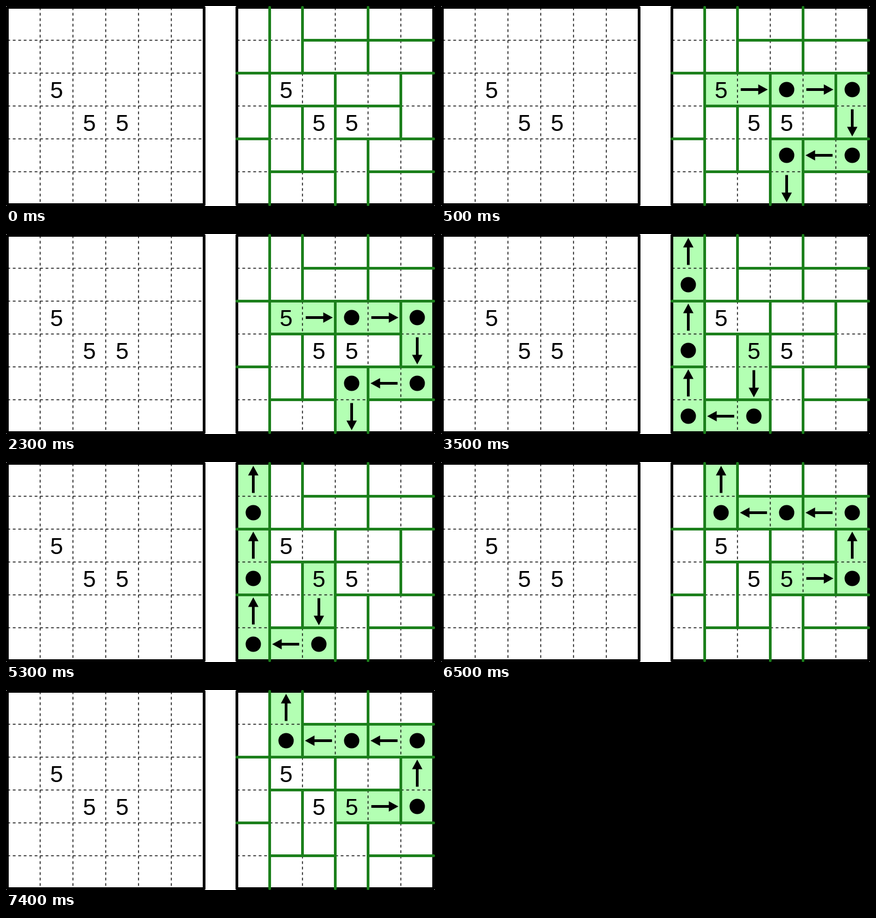
These frames come from a looping animation (785 px wide and 365 px high, 8000 ms). An HTML page:

```html
<!DOCTYPE html>
<html lang="en">
<head>
<meta charset="utf-8">
<title>Domino path puzzle</title>
<style>
html, body { margin: 0; width: 100%; height: 100%; overflow: hidden; background: #fff; }
svg { display: block; width: 785px; height: 365px; }
.dash { fill: none; stroke: #000; stroke-width: 1.5; stroke-dasharray: 5 5; }
.frame { fill: none; stroke: #000; stroke-width: 5; stroke-linejoin: round; }
.wall { fill: none; stroke: #1c801c; stroke-width: 5; stroke-linecap: round; }
.area { fill: #b3ffb3; }
text { font: 42.67px "Liberation Sans", Arial, sans-serif; text-anchor: middle; }
</style>
</head>
<body>
<svg id="stage" viewBox="0 0 785 365"></svg>
<script>
const CELL = 60, N = 6, LEFT = 2.5, RIGHT = 422.5, TOP = 2.5, LOOP = 8000;
const stage = document.getElementById('stage');

// Walls between dominoes: [line, from, to] in cells
const rows = [[1, 2, 6], [2, 0, 6], [3, 1, 5], [4, 0, 1], [4, 3, 6], [5, 1, 3], [5, 4, 6]];
const cols = [[1, 0, 6], [2, 0, 2], [2, 3, 5], [3, 2, 6], [4, 0, 2], [4, 4, 6], [5, 2, 4]];
const clues = [[1, 2], [2, 3], [3, 3]];

// Each path starts on a clue, then alternates arrows and dots
const paths = [
  { from: 500, to: 3500, start: [1, 2], moves: 'RRRRDDLLD' },
  { from: 3500, to: 6500, start: [2, 3], moves: 'DDLLUUUUU' },
  { from: 6500, to: 8000, start: [3, 3], moves: 'RRUULLLLU' }
];
const steps = { R: [1, 0, 0], D: [0, 1, 90], L: [-1, 0, 180], U: [0, -1, 270] };

function add(parent, tag, attrs, text) {
  const el = document.createElementNS('http://www.w3.org/2000/svg', tag);
  for (const key in attrs) el.setAttribute(key, attrs[key]);
  if (text) el.textContent = text;
  parent.appendChild(el);
  return el;
}

const px = c => RIGHT + c * CELL;
const py = r => TOP + r * CELL;

// Cells visited, each with the direction of the move that entered it
function trace({ start, moves }) {
  let [c, r] = start;
  const cells = [{ c, r }];
  for (const m of moves) {
    c += steps[m][0];
    r += steps[m][1];
    cells.push({ c, r, turn: steps[m][2] });
  }
  return cells;
}

function drawGrid(x) {
  let d = '';
  for (let i = 1; i < N; i++) {
    const p = i * CELL;
    d += `M${x} ${TOP + p}h${N * CELL}M${x + p} ${TOP}v${N * CELL}`;
  }
  add(stage, 'path', { class: 'dash', d });
  add(stage, 'rect', { class: 'frame', x, y: TOP, width: N * CELL, height: N * CELL });
}

function drawClues(x) {
  for (const [c, r] of clues)
    add(stage, 'text', { x: x + (c + 0.5) * CELL, y: py(r) + 45.5 }, '5');
}

function drawSymbols(group, cells) {
  cells.forEach(({ c, r, turn }, i) => {
    if (!i) return;
    const x = px(c + 0.5), y = py(r + 0.5);
    if (i % 2) {
      add(group, 'path', {
        d: 'M-24 -2.5H8V-9.5L25.5 0L8 9.5V2.5H-24Z',
        transform: `translate(${x} ${y}) rotate(${turn})`
      });
    } else {
      add(group, 'circle', { cx: x, cy: y, r: 14 });
    }
  });
}

const traces = paths.map(trace);
const areas = traces.map(cells => {
  const g = add(stage, 'g', { class: 'area' });
  for (const { c, r } of cells)
    add(g, 'rect', { x: px(c), y: py(r), width: CELL, height: CELL });
  return g;
});

drawGrid(LEFT);
drawGrid(RIGHT);
add(stage, 'path', {
  class: 'wall',
  d: rows.map(([r, a, b]) => `M${px(a)} ${py(r)}H${px(b)}`).join('') +
     cols.map(([c, a, b]) => `M${px(c)} ${py(a)}V${py(b)}`).join('')
});
drawClues(LEFT);
drawClues(RIGHT);

const symbols = traces.map(cells => {
  const g = add(stage, 'g', {});
  drawSymbols(g, cells);
  return g;
});

function render(t) {
  paths.forEach(({ from, to }, i) => {
    const show = t >= from && t < to ? 'visible' : 'hidden';
    areas[i].setAttribute('visibility', show);
    symbols[i].setAttribute('visibility', show);
  });
}

const begin = performance.now();
function tick() {
  render((performance.now() - begin) % LOOP);
  requestAnimationFrame(tick);
}
tick();
</script>
</body>
</html>
```
